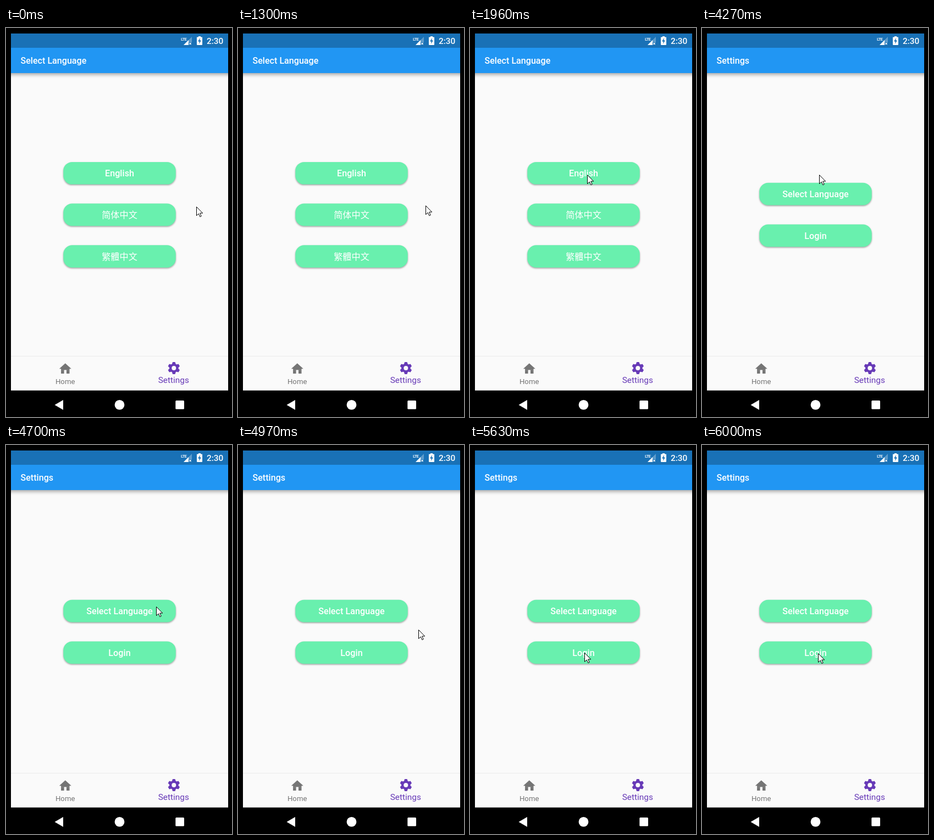
An HTML page with a canvas that plays this animation: 411 px wide and 708 px high, repeating every 8 s.

```html
<!DOCTYPE html>
<html lang="en">
<head>
<meta charset="utf-8">
<title>Language settings</title>
<style>
html, body { margin: 0; width: 100%; height: 100%; overflow: hidden; background: #000; }
canvas { display: block; }
</style>
</head>
<body>
<canvas id="stage" width="411" height="708"></canvas>
<script>
const ctx = document.getElementById('stage').getContext('2d');
const LOOP = 8000;
const PAGE_SWITCH = 4270;
const FIRST_TICK = 1300;
const TICK = 4700 / 36;
const SANS = 'Roboto, "Noto Sans CJK SC", sans-serif';
const SCREEN = { x: 9, y: 10, w: 395, h: 649.6 };
const WHITE = '#fff', PAPER = '#fafafa', BLUE = '#2196f3', DARK_BLUE = '#1971b6';
const MINT = '#69f0ae', GREY = '#757575', PURPLE = '#673ab7';

// Resting and turning points of the pointer; it glides between them
const stops = [
  { tick: -1, x: 346, y: 325 },
  { tick: 5, x: 213, y: 267 },
  { tick: 25, x: 213, y: 267 },
  { tick: 27, x: 333, y: 321 },
  { tick: 28, x: 328, y: 336 },
  { tick: 30, x: 285, y: 396 },
  { tick: 32, x: 206, y: 427 },
  { tick: 33, x: 208, y: 378 },
  { tick: 36, x: 211, y: 379 }
];

const ease = u => u * u * u * (u * (6 * u - 15) + 10);
const mix = (a, b, k) => Math.round(a + (b - a) * k);

function pointerAt(t) {
  const tick = Math.floor((t - FIRST_TICK) / TICK + 1e-6);
  const next = stops.findIndex(s => s.tick > tick);
  if (next < 0) return stops[stops.length - 1];
  if (next === 0) return stops[0];
  const a = stops[next - 1], b = stops[next];
  const k = ease((tick - a.tick) / (b.tick - a.tick));
  return { x: mix(a.x, b.x, k), y: mix(a.y, b.y, k) };
}

function rect(x, y, w, h, color) {
  ctx.fillStyle = color;
  ctx.fillRect(x, y, w, h);
}

function round(x, y, w, h, r, color) {
  ctx.beginPath();
  ctx.roundRect(x, y, w, h, r);
  ctx.fillStyle = color;
  ctx.fill();
}

function disc(x, y, r, color) {
  ctx.beginPath();
  ctx.arc(x, y, r, 0, 2 * Math.PI);
  ctx.fillStyle = color;
  ctx.fill();
}

function shape(color, ...points) {
  ctx.beginPath();
  points.forEach(([x, y]) => ctx.lineTo(x, y));
  ctx.closePath();
  ctx.fillStyle = color;
  ctx.fill();
}

function text(label, x, y, size, weight, color, align = 'left') {
  ctx.font = `${weight} ${size}px ${SANS}`;
  ctx.textAlign = align;
  ctx.fillStyle = color;
  ctx.fillText(label, x, y);
}

function withShadow(alpha, blur, dy, draw) {
  ctx.save();
  ctx.shadowColor = `rgba(0,0,0,${alpha})`;
  ctx.shadowBlur = blur;
  ctx.shadowOffsetY = dy;
  draw();
  ctx.restore();
}

function at(x, y, draw) {
  ctx.save();
  ctx.translate(x, y);
  draw();
  ctx.restore();
}

function signal() {
  const wedge = (x, size, color) =>
    shape(color, [x, 31 - size], [x, 31], [x - size, 31]);
  wedge(338, 15, 'rgba(255,255,255,.3)');
  wedge(332, 9, WHITE);
  rect(332, 26, 6, 5, DARK_BLUE);
  ctx.beginPath();
  for (const d of [-1.7, 1.7]) {
    ctx.moveTo(335 - d, 26.8);
    ctx.lineTo(335 + d, 30.2);
  }
  ctx.strokeStyle = WHITE;
  ctx.lineWidth = 1.2;
  ctx.stroke();
}

function battery() {
  rect(350, 15, 4, 2, WHITE);
  round(347, 16.5, 10, 14.5, 1, WHITE);
  shape(DARK_BLUE, [353, 18], [349, 24.5], [352, 24.5]);
  shape(DARK_BLUE, [351, 29], [355, 22.5], [352, 22.5]);
}

function statusBar() {
  rect(0, 10, 411, 26, DARK_BLUE);
  ctx.letterSpacing = '-1px';
  text('LTE', 318, 23, 8, 500, WHITE);
  ctx.letterSpacing = '0px';
  signal();
  battery();
  text('2:30', 365, 29, 15.4, 500, WHITE);
}

function appBar(title) {
  withShadow(.38, 7, 2.5, () => rect(0, 36, 411, 46, BLUE));
  text(title, 26.5, 65, 16.1, 500, WHITE);
}

function button(label, y, weight = 500) {
  withShadow(.36, 3, 1.5, () => round(104.3, y, 204.4, 40.7, 16, MINT));
  text(label, 206.5, Math.round(y + 26.3), 16.2, weight, WHITE, 'center');
}

function homeIcon() {
  shape(GREY, [0, -10], [11, 0], [-11, 0]);
  rect(-7.7, -1, 15.4, 3.2, GREY);
  rect(-7.7, 2, 5.5, 6.8, GREY);
  rect(2.2, 2, 5.5, 6.8, GREY);
}

function gearIcon() {
  disc(0, 0, 8.2, PURPLE);
  for (let i = 0; i < 6; i++) {
    shape(PURPLE, [-3.4, -7], [-2.3, -11], [2.3, -11], [3.4, -7]);
    ctx.rotate(Math.PI / 3);
  }
  disc(0, 0, 4, PAPER);
}

function tabBar() {
  withShadow(.16, 2, -.5, () => rect(0, 598, 411, 62, PAPER));
  at(107.8, 620.2, homeIcon);
  at(305.3, 619, gearIcon);
  text('Home', 107.7, 648, 13.2, 400, GREY, 'center');
  text('Settings', 304.8, 646, 15.4, 400, PURPLE, 'center');
}

function systemBar() {
  shape(WHITE, [88.5, 686], [104, 677], [104, 695]);
  disc(206.5, 685.9, 8.9, WHITE);
  round(308.3, 678.1, 15.7, 15.7, 1.5, WHITE);
}

function pointer() {
  shape(WHITE, [.5, .5], [.5, 16.5], [4.2, 13], [6.8, 18.6], [9.2, 17.5], [6.7, 12], [11.7, 12]);
  ctx.strokeStyle = '#000';
  ctx.lineWidth = 1;
  ctx.lineJoin = 'round';
  ctx.stroke();
}

function page(t) {
  if (t < PAGE_SWITCH) {
    appBar('Select Language');
    button('English', 243.9);
    button('简体中文', 319.6, 400);
    button('繁體中文', 395.3, 400);
  } else {
    appBar('Settings');
    button('Select Language', 281.8);
    button('Login', 357.5);
  }
}

function draw(t) {
  rect(0, 0, 411, 708, '#000');
  ctx.save();
  ctx.beginPath();
  ctx.rect(SCREEN.x, SCREEN.y, SCREEN.w, SCREEN.h);
  ctx.clip();
  rect(0, 0, 411, 708, PAPER);
  page(t);
  statusBar();
  tabBar();
  ctx.restore();
  systemBar();
  const { x, y } = pointerAt(t);
  at(x, y, pointer);
}

const start = performance.now();
function tick() {
  draw((performance.now() - start) % LOOP);
  requestAnimationFrame(tick);
}
tick();
</script>
</body>
</html>
```
